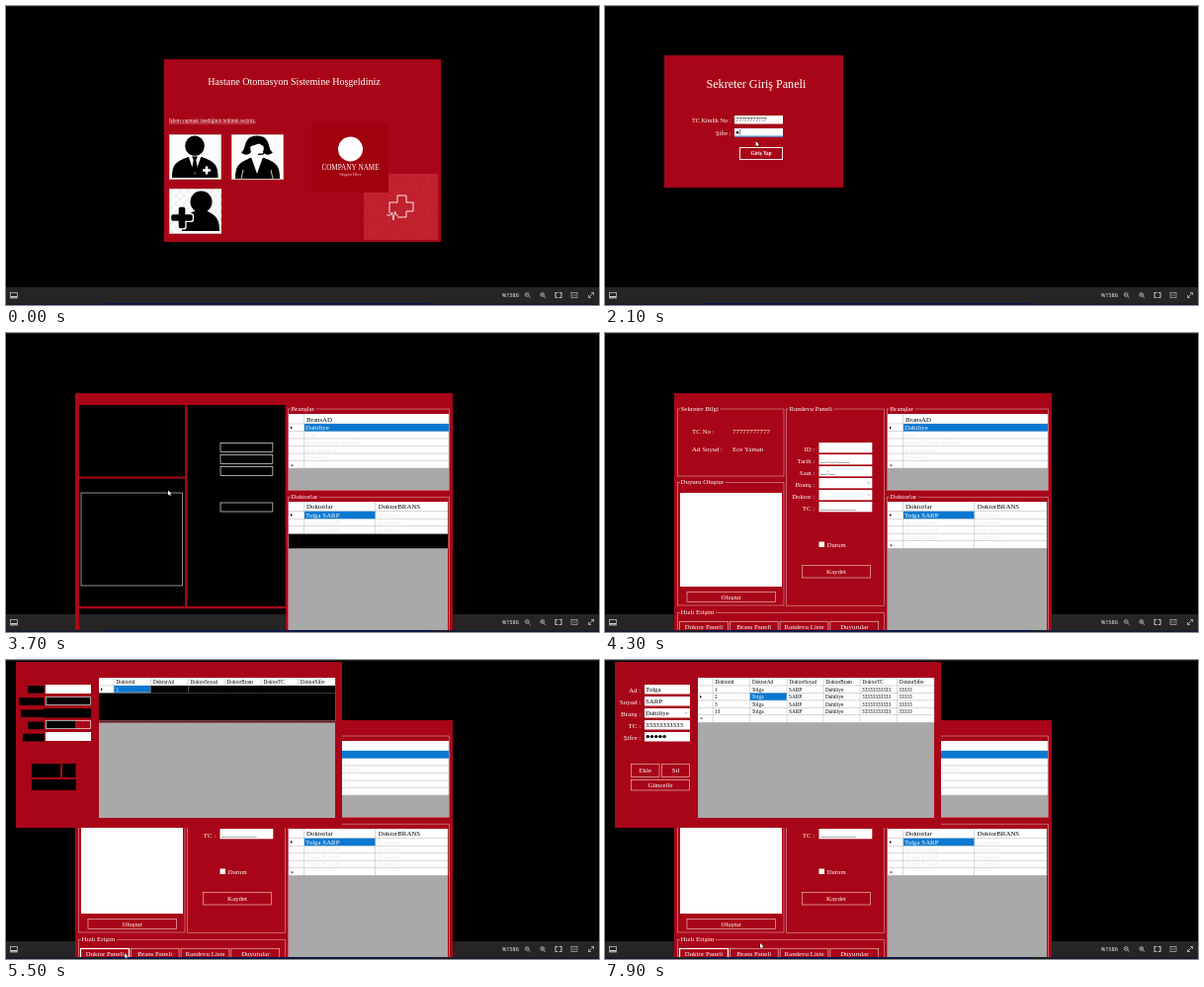
An HTML page with a canvas for the animation above (8000 ms loop, 600x303 px).

```html
<!DOCTYPE html>
<html lang="tr">
<head>
<meta charset="utf-8">
<title>Hastane Otomasyon</title>
<style>
html, body { margin: 0; width: 100%; height: 100%; overflow: hidden; background: #000; }
canvas { display: block; width: 600px; height: 303px; }
</style>
</head>
<body>
<canvas id="stage"></canvas>
<script>
const LOOP = 8000, STEP = 100;
const RED = '#a80618', BLUE = '#0a78d2', GRAY = '#a9a9a9', GRID = '#b0b0b0', GHOST = '#e9e9e9';
const BAR = '#262425', ICON = '#d0d0d0', EDGE = 'rgba(255,255,255,.8)';
const SERIF = '"Liberation Serif", "Times New Roman", serif';
const SANS = '"Open Sans", "Noto Sans", sans-serif';
const FIRST = 'Tolga', LAST = 'SARP', DOCTOR = FIRST + ' ' + LAST;

const canvas = document.getElementById('stage');
const ratio = window.devicePixelRatio || 1;
canvas.width = 600 * ratio;
canvas.height = 303 * ratio;
const g = canvas.getContext('2d');
g.scale(ratio, ratio);

// Boxes are given by their left, top, right and bottom edges.
function box(l, t, r, b, color) {
  g.fillStyle = color;
  g.fillRect(l, t, r - l, b - t);
}

function frame(l, t, r, b, color = EDGE, w = 0.8) {
  g.strokeStyle = color;
  g.lineWidth = w;
  g.strokeRect(l + 0.5, t + 0.5, r - l - 1, b - t - 1);
}

function text(s, x, y, size = 6.9, color = '#fff', align = 'left', style = '', family = SERIF) {
  g.font = `${style} ${size}px ${family}`;
  g.fillStyle = color;
  g.textAlign = align;
  g.fillText(s, x, y);
}

function poly(points, color) {
  g.beginPath();
  points.forEach(([x, y]) => g.lineTo(x, y));
  g.closePath();
  g.fillStyle = color;
  g.fill();
}

function stroke(points, color, w = 0.8) {
  g.beginPath();
  points.forEach(([x, y]) => g.lineTo(x, y));
  g.strokeStyle = color;
  g.lineWidth = w;
  g.stroke();
}

function oval(x, y, rx, ry, color) {
  g.beginPath();
  g.ellipse(x, y, rx, ry, 0, 0, Math.PI * 2);
  g.fillStyle = color;
  g.fill();
}

function plus(x, y, r, w, color, round = 0) {
  g.fillStyle = color;
  g.beginPath();
  g.roundRect(x - r, y - w, 2 * r, 2 * w, round);
  g.roundRect(x - w, y - r, 2 * w, 2 * r, round);
  g.fill();
}

function button(label, l, t, r, b, size = 6.9) {
  frame(l, t, r, b, 'rgba(255,255,255,.7)', 0.7);
  text(label, (l + r) / 2, (t + b) / 2 + size * 0.32, size, '#fff', 'center');
}

function group(label, l, t, r, b) {
  frame(l, t, r, b, 'rgba(255,255,255,.6)', 0.6);
  g.font = `6.9px ${SERIF}`;
  box(l + 3, t - 1, l + 5 + g.measureText(label).width, t + 2, RED);
  text(label, l + 3.5, t + 2.3);
}

function bullets(n, x, y, r, gap) {
  for (let i = 0; i < n; i++) oval(x + i * gap, y, r, r, '#000');
}

function chevron(x, y) {
  stroke([[x - 1.4, y - 0.7], [x, y + 0.7], [x + 1.4, y - 0.7]], '#777', 0.6);
}

function pointer(x, y) {
  poly([[x, y - 1.5], [x + 1.8, y], [x, y + 1.5]], '#000');
}

function bar() {
  box(0, 0, 600, 1, '#202022');
  box(0, 285, 600, 303, BAR);
  box(0, 301.5, 600, 303, '#141a30');
  box(100, 301, 430, 302.5, '#0c1650');
  frame(4, 290, 12, 296.5, ICON, 0.7);
  box(5, 294, 11, 295.5, ICON);
  text('%1586', 501.7, 295, 5.5, '#fff', 'left', '', SANS);
  for (const x of [527.2, 542.7]) {
    g.beginPath();
    g.arc(x, 292.5, 1.9, 0, 7);
    g.strokeStyle = ICON;
    g.lineWidth = 0.7;
    g.stroke();
    stroke([[x + 1.5, 294], [x + 3.3, 295.8]], ICON);
    stroke([[x - 1, 292.5], [x + 1, 292.5]], ICON, 0.6);
  }
  stroke([[542.7, 291.5], [542.7, 293.5]], ICON, 0.6);
  frame(555.5, 290, 562.5, 296, ICON, 0.8);
  box(558, 289.5, 560, 296.5, BAR);
  frame(555.5, 290, 562.5, 296, 'rgba(208,208,208,.5)', 0.6);
  frame(571.5, 290, 578.5, 296, ICON, 0.6);
  stroke([[574, 291.8], [574, 294.2]], ICON, 0.5);
  stroke([[576, 291.8], [576, 294.2]], ICON, 0.5);
  stroke([[589.5, 295.5], [594.5, 290.5]], ICON, 0.7);
  stroke([[592, 290.5], [594.5, 290.5], [594.5, 293]], ICON, 0.7);
  stroke([[589.5, 293], [589.5, 295.5], [592, 295.5]], ICON, 0.7);
}

function tile(x, y, checker, draw) {
  g.save();
  g.translate(x, y);
  box(0, 0, 53, 46, '#c4a5a8');
  box(0.7, 0.7, 52.3, 45.3, '#fcfcfc');
  for (let i = 1; checker && i < 51; i += 4)
    for (let j = 1; j < 44; j += 4)
      if ((i + j) % 8 === 2) box(i, j, i + 4, j + 4, '#f3f3f3');
  draw();
  g.restore();
}

function shoulders(l, r, top, bottom) {
  const m = (l + r) / 2;
  g.beginPath();
  g.moveTo(l, bottom);
  g.bezierCurveTo(l, top + 8, l + 3, top + 5, m - 7, top);
  g.lineTo(m + 7, top);
  g.bezierCurveTo(r - 3, top + 5, r, top + 8, r, bottom);
  g.fillStyle = '#000';
  g.fill();
}

function doctorIcon() {
  shoulders(3, 49.5, 23, 44);
  oval(26, 11.8, 9.8, 10.3, '#000');
  poly([[19.5, 22], [26, 41], [32.5, 22]], '#fff');
  poly([[23, 22.5], [29, 22.5], [27.3, 26], [29, 35], [26, 40], [23, 35], [24.7, 26]], '#000');
  plus(38, 36.5, 4, 1.3, '#fff');
}

function clerkIcon() {
  shoulders(4, 49, 24, 45);
  g.beginPath();
  g.moveTo(10, 18);
  g.bezierCurveTo(16, 16, 11, 1.5, 26, 1.5);
  g.bezierCurveTo(41, 1.5, 36, 16, 42, 18);
  g.bezierCurveTo(39, 22, 34, 21, 32, 18);
  g.lineTo(20, 18);
  g.bezierCurveTo(18, 21, 13, 22, 10, 18);
  g.fillStyle = '#000';
  g.fill();
  oval(26, 14.5, 6.8, 7.5, '#fff');
  poly([[18.5, 12.5], [19, 7], [33, 7], [33.5, 12.5], [28, 9.5]], '#000');
  stroke([[34, 17], [32, 20], [27, 20.3]], '#000', 1.3);
  poly([[20, 23], [26, 40], [32, 23]], '#fff');
  stroke([[18, 24], [25, 44]], '#000', 1);
  stroke([[12, 36], [10, 45]], '#fff', 0.8);
  stroke([[40, 36], [42, 45]], '#fff', 0.8);
}

function patientIcon() {
  shoulders(13, 51, 23, 43);
  oval(32.5, 13.5, 11, 11, '#000');
  plus(13, 29.5, 12, 4.6, '#fff', 2.5);
  plus(13, 29.5, 10.8, 3.3, '#000', 1.8);
}

function welcome() {
  box(160, 54, 440, 239, RED);
  text('Hastane Otomasyon Sistemine Hoşgeldiniz', 204.3, 80, 10.05);
  text('İşlem yapmak istediğiniz bölümü seçiniz.', 165, 117.7, 5.3);
  stroke([[165, 119], [252.5, 119]], '#e0a0a6', 0.6);
  tile(165, 130, false, doctorIcon);
  tile(228, 130, false, clerkIcon);
  tile(165, 185, true, patientIcon);

  box(362, 170, 437, 237, '#bf202c');
  let seed = 7;
  const rnd = () => (seed = (seed * 16807) % 2147483647) / 2147483647;
  for (let i = 0; i < 700; i++) {
    const x = 362 + rnd() * 74, y = 170 + rnd() * 66;
    box(x, y, x + 1, y + 0.8, 'rgba(220,80,90,.3)');
  }
  stroke([[388, 210], [388, 199], [396, 199], [396, 192], [405, 192], [405, 199], [412, 199],
    [412, 208], [405, 208], [405, 214], [396, 214]], '#fff', 0.9);
  stroke([[385, 212], [389, 212], [390.5, 209], [392, 217], [393.5, 208], [395, 212], [397, 212]], '#fff', 0.8);

  box(309, 119, 387, 189, '#a1000d');
  oval(348.5, 145, 12.5, 12.5, '#fff');
  text('COMPANY NAME', 348.5, 166, 7.2, '#fff', 'center');
  text('Slogan Here', 348.5, 172.3, 4.5, '#f0d0d2', 'center');
}

function login(t) {
  box(60, 50, 241, 184, RED);
  text('Sekreter Giriş Paneli', 102.5, 83.2, 12.1);
  if (t < 700) {
    box(87, 112, 130, 119.5, '#000');
    box(110, 125, 129.5, 132.5, '#000');
    box(131, 111, 180, 119, '#fff');
    box(163, 117.5, 180, 119, BLUE);
    box(131, 124, 180, 132.5, '#000');
    frame(131, 124, 180, 132.5);
    box(136, 143, 180, 156, '#000');
    return;
  }
  text('TC Kimlik No :', 127.3, 117.7, 6.2, '#fff', 'right');
  text('Şifre :', 127.3, 131, 6.2, '#fff', 'right');
  box(131, 111, 180, 119.5, '#fff');
  box(131, 124, 180, 132.5, '#fff');
  const first = t < 1900;
  const y = first ? 119 : 132;
  box(131, y - 0.4, 180, y + 0.5, BLUE);
  const digits = Math.max(0, Math.min(11, Math.floor((t - 1000) / 80)));
  const dots = Math.max(0, Math.min(5, Math.floor((t - 2000) / 100)));
  text('7'.repeat(digits), 132.3, 117.3, 5.7, '#000');
  bullets(dots, 134, 128.2, 1.3, 3.3);
  const caret = first ? 132.8 + digits * 2.85 : 132.8 + dots * 3.3;
  box(caret, y - 7, caret + 0.5, y - 1.5, '#000');
  frame(136, 143, 180, 156, '#fff', 0.9);
  text('Giriş Yap', 158, 151.3, 5.2, '#fff', 'center', 'bold');
}

// Draws a white table body with rules at the given columns and rows.
function table(cols, rows) {
  const l = cols[0], r = cols[cols.length - 1], b = rows[rows.length - 1];
  box(l, rows[0], r, b, '#fff');
  for (const y of rows.slice(1)) box(l, y - 0.25, r, y + 0.25, GRID);
  for (const x of cols.slice(1)) box(x - 0.25, rows[0], x + 0.25, b, GRID);
}

const rowsFrom = (top, first, h, n) => [top, ...Array.from({ length: n + 1 }, (_, i) => first + i * h)];

function sideTables(painted) {
  group('Branşlar', 285, 76.5, 449, 160);
  box(286, 82, 448, 159, GRAY);
  table([286, 301.5, 448], rowsFrom(82, 92, 7.5, 6));
  text('BransAD', 304, 89.8, 6.9, '#000');
  box(302, 92, 448, 99.6, BLUE);
  text('Dahiliye', 303, 98.4);
  ['Göz', 'Kulak Burun Boğaz', 'Kardiyoloji', 'Nöroloji'].forEach((s, i) =>
    text(s, 303, 105.7 + i * 7.5, 6.9, GHOST));
  pointer(288, 96);
  text('*', 288, 137, 6, '#000');

  group('Doktorlar', 285, 165.7, 449, 304);
  box(286, 171, 447, 301, GRAY);
  table([286, 301.5, 373.7, 447], rowsFrom(171, 180.7, 7.5, 5));
  text('Doktorlar', 304, 178.4, 6.9, '#000');
  text('DoktorBRANS', 376.7, 178.4, 6.9, '#000');
  for (let i = 0; i < 4; i++) {
    if (i) text(DOCTOR, 303, 186.9 + i * 7.5, 6.9, GHOST);
    text('Dahiliye', 376, 186.9 + i * 7.5, 6.9, GHOST);
  }
  box(302, 180.7, 373.5, 188.2, BLUE);
  text(DOCTOR, 303, 186.9);
  pointer(288, 184.5);
  if (painted) text('*', 288, 217.7, 6, '#000');
  else box(286, 203.7, 447, 218.3, '#000');
}

function desk(t) {
  const painted = t >= 3800;
  g.save();
  g.beginPath();
  g.rect(70, 61, 382, 240);
  g.clip();
  box(70, 61, 452, 301, RED);
  sideTables(painted);
  if (!painted) {
    // Unpainted groups are see-through, so the bar shows in the lowest one.
    box(74, 73, 181, 145.5, '#000');
    box(74, 147.5, 181, 277, '#000');
    box(183.3, 73, 282.5, 277, '#000');
    box(74, 279.3, 283, 285, '#000');
    box(74, 285, 283, 301, BAR);
    for (const y of [111, 123, 135, 171.5]) frame(216.5, y, 270.3, y + 10);
    frame(75.5, 161.5, 179, 256.5, 'rgba(255,255,255,.7)');
    g.restore();
    return;
  }
  group('Sekreter Bilgi', 73, 76.5, 181.5, 145.5);
  text('TC No :', 88, 102);
  text('7'.repeat(11), 129, 102);
  text('Ad Soyad :', 88, 119.5);
  text('Ece Yaman', 129, 119.5);

  group('Duyuru Oluştur', 73, 151, 181.5, 276.5);
  box(76, 162, 179, 257, '#fff');
  button('Oluştur', 82.5, 262, 173, 273);

  group('Randevu Paneli', 183, 76.5, 283, 277);
  const masks = ['', '__.__.____', '__:__', '', '', '_'.repeat(11)];
  ['ID', 'Tarih', 'Saat', 'Branş', 'Doktor', 'TC'].forEach((s, i) => {
    const y = 111 + i * 12;
    text(s + ' :', 212.3, y + 8.7, 6.9, '#fff', 'right');
    box(216.5, y, 270.3, y + 10.3, '#fff');
    text(masks[i], 218, y + 7.8, 6.5, '#000');
    if (i === 3 || i === 4) chevron(267, y + 5);
  });
  box(216.5, 211.5, 222, 217, '#fff');
  text('Durum', 224.7, 216.7, 6.7);
  button('Kaydet', 199, 235, 269, 248.5);

  group('Hızlı Erişim', 73, 283, 283, 304);
  ['Doktor Paneli', 'Brans Paneli', 'Randevu Liste', 'Duyurular'].forEach((s, i) => {
    const l = 75 + i * 50.8;
    button(s, l, 292, l + 49.8, 304.5);
  });
  if (t >= 5400) frame(75, 292, 125, 304.5, '#fff', 1.2);
  g.restore();
}

const DOC_COLS = [94, 109, 146.5, 184, 221, 258, 295.3, 333];

function doctors(t) {
  const painted = t >= 5700, picked = t >= 6700, filled = t >= 7000;
  box(10, 2, 340, 170, RED);
  box(94, 18, 333, 160, GRAY);
  table(DOC_COLS, rowsFrom(18, 26, 7.45, 5));
  ['id', 'Ad', 'Soyad', 'Brans', 'TC', 'Sifre'].forEach((s, i) =>
    text('Doktor' + s, DOC_COLS[i + 1] + 2.5, 23.7, 5.2, '#000'));

  const top = picked ? 33.45 : 26, col = picked ? 2 : 1;
  box(DOC_COLS[col] + 0.3, top, DOC_COLS[col + 1] - 0.3, top + 7.3, BLUE);
  pointer(96, top + 3.8);

  if (!painted) {
    box(146.5, 26, 333, 33.5, '#000');
    box(94, 33.5, 333, 61.5, '#000');
    box(94, 61.5, 333, 63.5, '#6b1018');
    box(184, 26, 184.6, 33, '#777');
    text('1', 111.5, 31.7, 5.3);
    for (let x = 110; x < 146; x += 2) box(x, 32.3, x + 1, 33, '#f0b060');
    [22, 13, 15, 22, 17].forEach((l, i) => box(l, 26 + i * 12.2, 38.5, 33.6 + i * 12.2, '#000'));
    box(40, 25, 86, 34, '#fff');
    box(40, 37, 86, 46, '#000');
    frame(40, 37, 86, 46);
    box(38, 49, 86, 58.5, '#000');
    box(40, 61, 70, 70, '#000');
    frame(40, 61, 86, 70);
    box(40, 73, 86, 82, '#fff');
    box(26, 105, 55, 119, '#000');
    box(57, 105, 70.5, 119, '#000');
    box(26, 121, 71, 132, '#000');
    return;
  }

  ['1', '2', '3', '13'].forEach((id, r) => {
    [id, FIRST, LAST, 'Dahiliye', '3'.repeat(11), '33333'].forEach((s, c) => {
      const lit = c + 1 === col && r === (picked ? 1 : 0);
      text(s, DOC_COLS[c + 1] + 2, 31.6 + r * 7.45, 5.3, lit ? '#fff' : '#000');
    });
  });
  text('*', 96, 62.2, 5.5, '#000');

  const values = filled ? [FIRST, LAST, 'Dahiliye', '3'.repeat(11), ''] : [];
  ['Ad', 'Soyad', 'Branş', 'TC', 'Şifre'].forEach((s, i) => {
    const y = 25 + i * 12;
    text(s + ' :', 36.3, y + 7.8, 7.1, '#fff', 'right');
    box(40, y, 86, y + 9.5, '#fff');
    text(values[i] || '', 41, y + 6.9, 6.9, '#000');
  });
  chevron(82, 53.7);
  if (filled) bullets(5, 43.3, 77.6, 1.7, 4.2);
  button('Ekle', 26, 105, 55.5, 119);
  button('Sil', 57, 105, 86, 119);
  button('Güncelle', 26, 121, 86, 132.5);
}

// Mouse stops: time, x, y.
const PATH = [
  [100, 262, 184], [400, 240.5, 162], [1000, 240.5, 162], [1800, 152, 127], [1900, 152, 127],
  [2100, 152.5, 137], [2600, 153, 138], [2800, 167, 148], [3500, 167, 149], [3700, 164, 159.5],
  [4000, 158, 180], [4900, 140, 240], [5400, 120, 297], [5700, 120, 297], [6500, 163, 36],
  [7400, 163, 36], [7900, 157, 287]
];

function mouse(t) {
  // Over the white note field the pointer is not shown.
  if (t < PATH[0][0] || (t >= 3900 && t < 4900)) return;
  let i = 0;
  while (i < PATH.length - 2 && t >= PATH[i + 1][0]) i++;
  const [ta, xa, ya] = PATH[i], [tb, xb, yb] = PATH[i + 1];
  const p = Math.min(1, (t - ta) / (tb - ta));
  const k = p * p * (3 - 2 * p);
  const x = xa + (xb - xa) * k, y = ya + (yb - ya) * k;
  const tip = [[0, 0], [0, 5], [1.2, 4], [2, 5.6], [2.8, 5.2], [2.1, 3.7], [3.6, 3.6]]
    .map(([dx, dy]) => [x + dx, y + dy]);
  stroke([...tip, tip[0]], '#000', 0.7);
  poly(tip, '#fff');
}

function draw(t) {
  box(0, 0, 600, 303, '#000');
  bar();
  if (t < 600) welcome();
  else if (t < 3700) login(t);
  else desk(t);
  if (t >= 5500) doctors(t);
  mouse(t);
}

const start = performance.now();
function tick() {
  const t = (performance.now() - start) % LOOP;
  draw(Math.floor(t / STEP) * STEP);
  requestAnimationFrame(tick);
}
tick();
</script>
</body>
</html>
```
